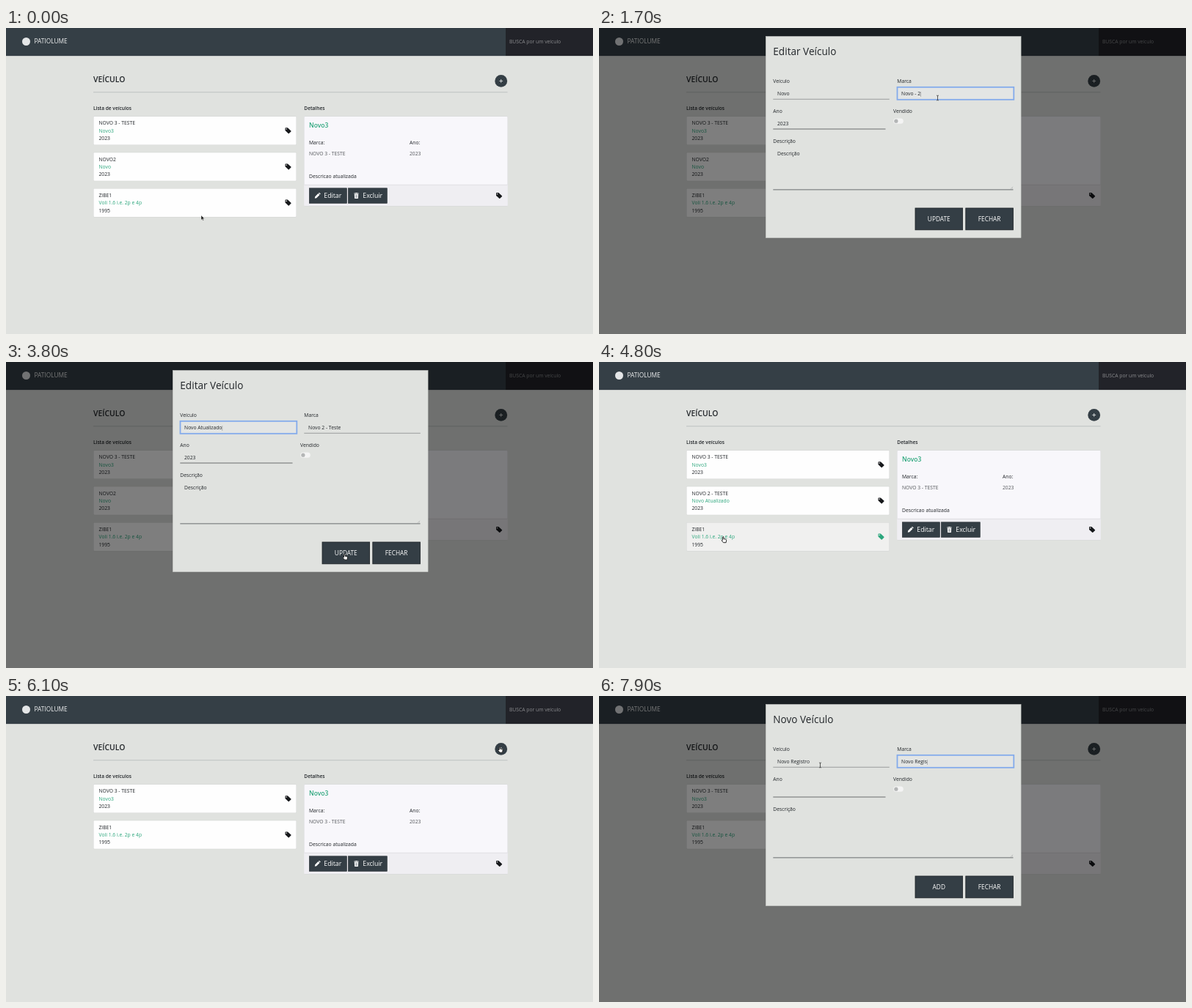
Write an HTML page that moves like this. It is 800 px wide and 418 px high and loops after 8000 ms.

```html
<!DOCTYPE html>
<html lang="pt">
<head>
<meta charset="utf-8">
<title>Veículos</title>
<style>
  html, body { margin: 0; width: 100%; height: 100%; overflow: hidden; background: #e0e2df; }
  svg { display: block; width: 800px; height: 418px; }
  text { font: 6.75px "Open Sans", "Noto Sans", sans-serif; fill: #212529; white-space: pre; }
</style>
</head>
<body>
<svg id="stage" viewBox="0 0 800 418"></svg>
<script>
const LOOP = 8000, STEP = 100;
const GREEN = '#2ba67c', SLATE = '#343e45', PAGE = '#e0e2df';

// Cursor stops: time, x, y, shape (a arrow, h hand, t text beam)
const PATH = [
  [0, 266, 256, 'a'], [100, 245, 222, 'h'], [200, 228, 192, 'h'], [300, 228, 192, 'h'],
  [600, 440, 230, 'h'], [900, 440, 230, 'a'], [1200, 461.5, 95.5, 't'], [3600, 461.5, 95.5, 't'],
  [3700, 462.5, 266, 'h'], [4000, 462.5, 266, 'a'], [4400, 300, 262, 'a'], [4800, 170.5, 242.5, 'h'],
  [5000, 190, 192, 'h'], [5100, 190, 192, 'h'], [5400, 492, 230, 'h'], [5500, 470, 245, 'a'],
  [5700, 384.5, 268, 'h'], [5800, 384.5, 268, 'a'], [6100, 674, 73, 'h'], [6200, 674, 73, 'a'],
  [6400, 301.5, 94.5, 't'], [LOOP, 301.5, 94.5, 't']
];

const NOVO3 = ['NOVO 3 - TESTE', 'Novo3', '2023', 'Descricao atualizada'];
const OLD = ['NOVO2', 'Novo', '2023', 'Descrição'];
const EDITED = ['NOVO 2 - TESTE', 'Novo Atualizado', '2023', 'Descrição'];
const LAST = ['ZIBE1', 'Voli 1.6 i.e. 2p e 4p', '1995', ''];
const HINTS = ['DE', 'as', 'asss', 'Novo', 'Novo3', 'Novo Atualizado'];

const between = (t, a, b) => t >= a && t < b;

const typing = (t, from, to, text, keep = 0) => {
  const p = Math.max(0, Math.min(1, (t - from) / (to - from)));
  return text.slice(0, keep + Math.round(p * (text.length - keep)));
};

const rect = (x, y, w, h, fill, more = '') =>
  `<rect x="${x}" y="${y}" width="${w}" height="${h}" fill="${fill}" ${more}/>`;

const line = (x1, x2, y, color) => rect(x1, y, x2 - x1, 0.8, color);

function text(x, y, str, { size = 6.75, weight = 400, fill = '#212529', mid = false } = {}) {
  const style = `font-size:${size}px;font-weight:${weight};fill:${fill};text-anchor:${mid ? 'middle' : 'start'}`;
  return `<text x="${x}" y="${y}" style="${style}">${str}</text>`;
}

const group = (x, y, body, more = '') => `<g transform="translate(${x} ${y})" ${more}>${body}</g>`;

const tag = (x, y, fill = '#17191c') => group(x, y,
  `<path fill="${fill}" fill-rule="evenodd" d="M-4-3.4q0-.6.6-.6H-.6L3.9.2q.5.5 0 1L1.2 3.8q-.5.5-1 0L-4-.1z
   M-2.4-3a.7.7 0 1 0 .01 0z"/>`);

const PENCIL = '<path fill="#fff" d="M-3.7 3.7l.5-2.4L1-2.9 2.9-1-1.3 3.2zM1.5-3.4l.6-.5q.5-.3.9.1l.9.9q.4.4 0 .8l-.5.6z"/>';
const TRASH = '<path fill="#fff" d="M-3.1-3.4h1.7l.5-.6h1.8l.5.6h1.7v.9h-6.2zM-2.7-2h5.4l-.3 5.5q0 .5-.6.5h-3.6q-.6 0-.6-.5z"/>' +
  '<path stroke="#69727a" stroke-width=".5" d="M-1.1-1v4M0-1v4M1.1-1v4"/>';

const POINTERS = {
  a: '<path fill="#111" stroke="#ddd" stroke-width=".5" d="M0 0v6.2l1.4-1.3 1 2.2 1-.4-1-2.2h2z"/>',
  h: '<path fill="#fff" stroke="#111" stroke-width=".9" d="M-1.9.7v-4.1q.7-.9 1.4 0v2.5l2.8.6q.9.3.8 1.2l-.5 3.3h-3.5L-3.4 1.4q.4-.9 1.5-.7z"/>',
  t: '<path fill="none" stroke="#333" stroke-width=".8" d="M-1.4-3.4q1.4 0 1.4.7v5.4q0 .7-1.4.7M1.4-3.4q-1.4 0-1.4.7M0 2.7q0 .7 1.4.7"/>'
};

function pointerAt(t) {
  const i = Math.max(0, PATH.findIndex(p => p[0] > t) - 1);
  const [t0, x0, y0, shape] = PATH[i], [t1, x1, y1] = PATH[i + 1];
  const p = (t - t0) / (t1 - t0);
  return { x: x0 + (x1 - x0) * p, y: y0 + (y1 - y0) * p, shape };
}

const header = () =>
  rect(0, 38, 800, 1, '#c9cccb') +
  rect(0, 0, 800, 38, '#353f46') +
  rect(681, 0, 119, 38, '#222329') +
  '<circle cx="27.5" cy="18.5" r="5.5" fill="#e4e6e7"/>' +
  text(38.5, 21, 'PATIOLUME', { size: 8.33, fill: '#f1f2f3' }) +
  text(686, 21, 'BUSCA por um veículo', { fill: '#8b8c8f' });

function card([brand, name, year], i, hover) {
  const y = 121 + i * 49.2;
  return rect(119, y - 0.4, 277, 39.4, '#d3d5d4', 'rx="1.5"') +
    rect(119.5, y, 276, 38.5, hover ? '#f0f0ef' : '#fefefe', 'rx="1"') +
    text(126.5, y + 11.3, brand) +
    text(126.5, y + 21.8, name, { fill: GREEN, weight: 500 }) +
    text(126.5, y + 32.2, year) +
    tag(384.5, y + 19.2, hover ? GREEN : undefined);
}

const pageButton = (x, w, icon, label) =>
  rect(x, 218.8, w, 20.6, SLATE, 'stroke="#262d32" stroke-width=".6"') +
  group(x + 11.2, 229, icon) +
  text(x + 20, 232.3, label, { size: 8.75, fill: '#fff' });

const details = ([brand, name, year, note]) =>
  rect(406, 120.6, 278, 122.8, '#d6d7d8', 'rx="1.5"') +
  rect(406.5, 121, 277, 122, '#f8f7fb', 'rx="1"') +
  rect(406.5, 214, 277, 29, '#efeef2') + line(406.5, 683.5, 213.8, '#dcdbe0') +
  text(413, 135.8, name, { size: 8.5, weight: 600, fill: GREEN }) +
  text(413, 159.4, 'Marca:', { weight: 500 }) + text(550, 159.4, 'Ano:', { weight: 500 }) +
  text(413, 173.5, brand, { fill: '#55585c' }) + text(550, 173.5, year, { fill: '#55585c' }) +
  text(413, 205, note) +
  pageButton(413.3, 51.2, PENCIL, 'Editar') +
  pageButton(466.3, 53, TRASH, 'Excluir') +
  tag(672, 229);

function page(t, cursor, free) {
  const second = t < 4200 ? [OLD] : t < 5900 ? [EDITED] : [];
  const rows = [NOVO3, ...second, LAST];
  const shown = between(t, 300, 4200) ? OLD : between(t, 5100, 5900) ? EDITED : NOVO3;
  const over = i => free && cursor.shape === 'h' && between(cursor.x, 119, 396) &&
    between(cursor.y - 121 - i * 49.2, 0, 38.5);
  return rect(0, 0, 800, 418, PAGE) + header() +
    text(119, 74, 'VEÍCULO', { size: 10.4, weight: 600 }) +
    line(119, 683.5, 87.4, '#b6bab9') +
    `<circle cx="674.7" cy="72.4" r="8.4" fill="${SLATE}"/>` +
    '<path stroke="#dfe2e3" stroke-width=".9" d="M672.3 72.4h4.8M674.7 70v4.8"/>' +
    text(119, 111.6, 'Lista de veículos', { size: 6.6, weight: 600 }) +
    text(406.3, 111.6, 'Detalhes', { size: 6.6, weight: 600 }) +
    rows.map((r, i) => card(r, i, over(i))).join('') + details(shown);
}

function field(x, value, focused) {
  const caret = focused ? '<tspan dx="-1.4" style="fill:#777">|</tspan>' : '';
  const frame = focused
    ? rect(x + 0.2, 80.8, 158.8, 17, '#e3e5e4', 'stroke="#84abeb" stroke-width="1.8"')
    : line(x, x + 158.5, 96.8, '#888b8b');
  return frame + text(x + 5.8, 91.8, value + caret);
}

const modalButton = (x, label) =>
  rect(x, 246, 64.6, 29.8, SLATE, 'stroke="#1b2024" stroke-width=".8"') +
  text(x + 32.3, 264, label, { size: 8.33, fill: '#fff', mid: true });

const modal = ({ title, name, brand, year, note, action, focus }) =>
  rect(227.3, 11.4, 347.8, 275.3, PAGE, 'stroke="#c4c5c2" stroke-width=".5"') +
  text(237.3, 37.3, title, { size: 13.6, weight: 500 }) +
  text(237.3, 75, 'Veículo') + text(406.3, 75, 'Marca') +
  field(237.3, name, focus === 'name') + field(406.3, brand, focus === 'brand') +
  text(237.3, 116, 'Ano') + text(401, 116, 'Vendido') +
  text(243, 132.6, year) + line(237.3, 390.5, 137.6, '#4b4f52') +
  rect(401.2, 123.6, 13.6, 7.2, '#f4f4f4', 'rx="3.6"') +
  '<circle cx="404.9" cy="127.2" r="2.6" fill="#b4b6b6"/>' +
  text(237.3, 157, 'Descrição') + text(243, 173.8, note) +
  line(237.3, 564.5, 220.5, '#4b4f52') +
  '<path stroke="#999" stroke-width=".5" d="M561 219.8l3-3M562.7 219.8l1.3-1.3"/>' +
  modalButton(431, action) + modalButton(499.8, 'FECHAR');

function hints(typed) {
  const list = HINTS.filter(h => h.startsWith(typed));
  if (!list.length) return '';
  return '<path fill="#232324" d="M285.5 101.5l4-4 4 4z"/>' +
    rect(280.6, 101, 68, 4.2 + list.length * 15.7, '#232324', 'rx="1.5"') +
    list.map((h, i) => text(286, 113.6 + i * 15.65, h, { fill: '#f0f0f0' })).join('');
}

const alertButton = (x, w, label, ring) =>
  rect(x, 254, w, 18.8, '#2f383e', `rx="1.5" stroke="${ring}" stroke-width="1.2"`) +
  text(x + w / 2, 265.8, label, { size: 6.5, weight: 700, fill: '#fff', mid: true });

const alertBox = () =>
  rect(290, 141, 222.5, 143, '#fff', 'rx="2"') +
  '<circle cx="401.2" cy="178" r="18.3" fill="none" stroke="#d8d4c2" stroke-width="1.9"/>' +
  '<path stroke="#d3cdb8" stroke-width="2.6" stroke-linecap="round" d="M401.2 170v9.5M401.2 185.2v.1"/>' +
  text(401.2, 223.8, 'Deseja realmente excluir esse', { size: 12.5, weight: 700, fill: '#545454', mid: true }) +
  text(401.2, 239.2, 'veículo?', { size: 12.5, weight: 700, fill: '#545454', mid: true }) +
  alertButton(363, 28.8, 'Sim!', '#a9bccb') + alertButton(396.8, 42, 'Cancelar', '#2f383e');

function editForm(t) {
  const brand = t < 1300 ? 'Novo2'
    : t < 1900 ? typing(t, 1300, 1700, 'Novo - 2', 4)
    : typing(t, 2000, 2700, 'Novo 2 - Teste', 5);
  return modal({
    title: 'Editar Veículo', action: 'UPDATE', year: '2023', note: 'Descrição', brand,
    name: typing(t, 3000, 3600, 'Novo Atualizado', 4),
    focus: t < 1200 ? '' : t < 2800 ? 'brand' : 'name'
  });
}

function newForm(t) {
  const name = typing(t, 6600, 7200, 'Novo Registro');
  return modal({
    title: 'Novo Veículo', action: 'ADD', year: '', note: '', name,
    brand: typing(t, 7400, 7900, 'Novo Regis'),
    focus: t < 6400 ? '' : t < 7300 ? 'name' : 'brand'
  }) + (between(t, 6500, 7300) ? hints(name) : '');
}

// Dialogs fade during their first and last step
const DIALOGS = [
  { from: 900, to: 4100, dim: 0.5, draw: editForm },
  { from: 5500, to: 5900, dim: 0.4, draw: alertBox },
  { from: 6200, to: LOOP + STEP, dim: 0.5, draw: newForm }
];

function scene(t) {
  const cursor = pointerAt(t);
  const dialog = DIALOGS.find(d => between(t, d.from, d.to));
  let out = page(t, cursor, !dialog);
  if (dialog) {
    const { from, to, dim, draw } = dialog;
    const show = t === from || t === to - STEP ? 0.6 : 1;
    out += rect(0, 0, 800, 418, '#000', `opacity="${dim * show}"`) +
      group(0, (show - 1) * 12, draw(t), `opacity="${show}"`);
  }
  return out + group(cursor.x, cursor.y, POINTERS[cursor.shape]);
}

const stage = document.getElementById('stage');
const start = performance.now();
let last = -1;

function tick() {
  const t = Math.floor(((performance.now() - start) % LOOP) / STEP) * STEP;
  if (t !== last) stage.innerHTML = scene(last = t);
  requestAnimationFrame(tick);
}
tick();
</script>
</body>
</html>
```
